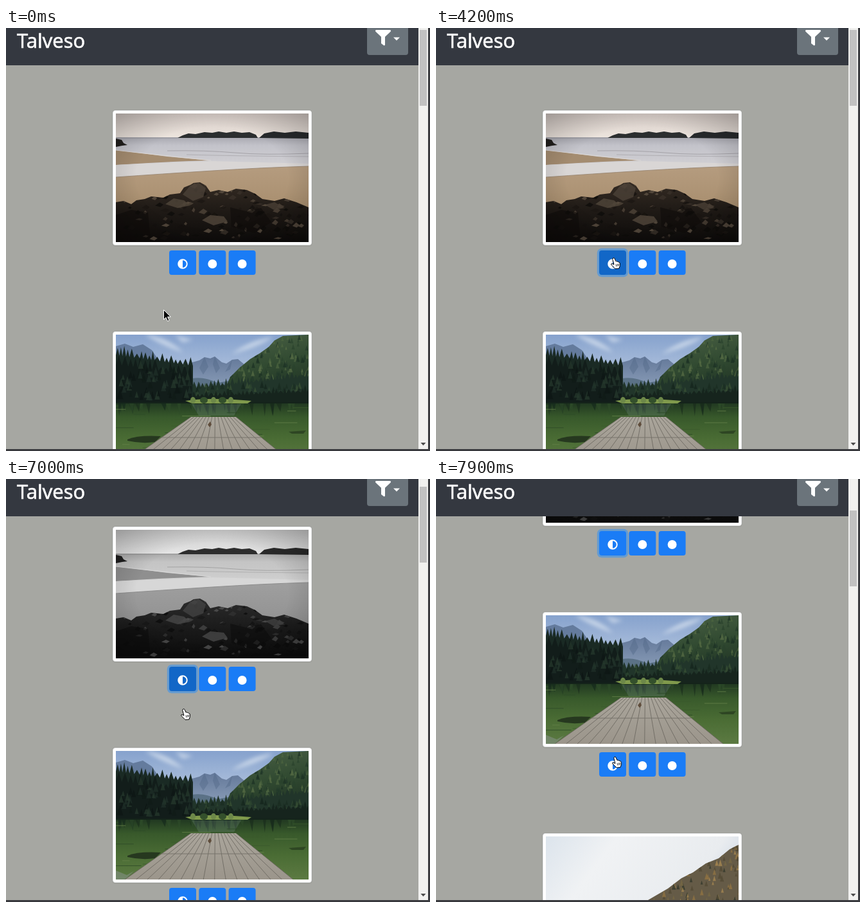
An HTML page for the animation above (8000 ms loop, 660 px wide and 658 px high).

```html
<!DOCTYPE html>
<html lang="en">
<head>
<meta charset="utf-8">
<title>Photo gallery</title>
<style>
  html, body { margin: 0; width: 100%; height: 100%; overflow: hidden; background: #a6a7a2; }
  svg { display: block; width: 660px; height: 658px; }
</style>
</head>
<body>
<svg id="stage" viewBox="0 0 660 658">
  <defs>
    <clipPath id="frame"><rect width="300" height="200"/></clipPath>
    <clipPath id="rockClip"><path id="rockShape" d="M0 138L12 136 24 141 32 135 45 133 55 129 74 131 84 126 100 124 106 115 116 111 121 108 131 107 140 112 147 122 160 119 174 122 187 117 204 119 217 125 228 133 247 136 262 132 281 138 300 146V200H0Z"/></clipPath>
    <clipPath id="slopeClip"><path id="slopeShape" d="M300 13L286 20 269 34 249 42 229 56 211 65 190 81 159 99 110 140 60 200H300Z"/></clipPath>
    <clipPath id="hillClip"><path id="hillShape" d="M178 66L192 52 209 38 224 29 238 19 247 9 260 2 300 0V106H160Z"/></clipPath>
    <filter id="soft"><feGaussianBlur stdDeviation="3"/></filter>
    <filter id="grain" x="0" y="0" width="1" height="1"><feGaussianBlur stdDeviation=".5"/></filter>
    <linearGradient id="sky1" x2="0" y2="1"><stop stop-color="#d3c9c4"/><stop offset="1" stop-color="#efe7e0"/></linearGradient>
    <linearGradient id="sea" x2="0" y2="1"><stop stop-color="#a9a9b1"/><stop offset=".2" stop-color="#c3c3ca"/><stop offset="1" stop-color="#d9d7d9"/></linearGradient>
    <linearGradient id="sand" x2="0" y2="1"><stop stop-color="#b59c7f"/><stop offset=".6" stop-color="#a78d6d"/><stop offset="1" stop-color="#8c7354"/></linearGradient>
    <linearGradient id="rock" x2="0" y2="1"><stop stop-color="#342b23"/><stop offset=".5" stop-color="#1e1915"/><stop offset="1" stop-color="#0d0b0a"/></linearGradient>
    <linearGradient id="sky2" x2="0" y2="1"><stop stop-color="#86a2cd"/><stop offset="1" stop-color="#c3d1e5"/></linearGradient>
    <linearGradient id="peak" x2="0" y2="1"><stop stop-color="#637899"/><stop offset="1" stop-color="#8a9db8"/></linearGradient>
    <linearGradient id="hill" x1=".2" x2=".5" y2="1"><stop stop-color="#4a6145"/><stop offset=".5" stop-color="#314a31"/><stop offset="1" stop-color="#1d2f22"/></linearGradient>
    <linearGradient id="lake" x2="0" y2="1"><stop stop-color="#1f3620"/><stop offset=".25" stop-color="#38592b"/><stop offset=".6" stop-color="#4a6c34"/><stop offset="1" stop-color="#5c7a42"/></linearGradient>
    <linearGradient id="dock" x2="0" y2="1"><stop stop-color="#aaa59b"/><stop offset="1" stop-color="#9b958b"/></linearGradient>
    <linearGradient id="fog" x2="1" y2=".5"><stop stop-color="#dce4ec"/><stop offset=".3" stop-color="#f0f2f4"/><stop offset=".75" stop-color="#e9ecef"/><stop offset="1" stop-color="#c3d0e2"/></linearGradient>
    <radialGradient id="vignette" r=".72"><stop offset=".55" stop-opacity="0"/><stop offset="1" stop-opacity=".25"/></radialGradient>
  </defs>
  <rect width="660" height="658" fill="#a6a7a2"/>
  <g id="page"></g>

  <rect width="642" height="58" fill="#343840"/>
  <text x="17" y="31" font-family="'Open Sans', 'Noto Sans', sans-serif" font-size="31" fill="#fff" stroke="#fff" stroke-width=".7">Talveso</text>
  <path d="M562 0H626V38Q626 42 622 42H566Q562 42 562 38Z" fill="#6b747b"/>
  <path d="M576 3H598Q600 4 598.700 5.400L590 13.800V26Q589.500 28 588 27L584 24V13.800L575.300 5.400Q574 4 576 3Z" fill="#fff"/>
  <path d="M603 14.500H613L608 19.500Z" fill="#fff"/>

  <rect x="642" width="15" height="655" fill="#f1f1ef"/>
  <rect id="thumb" x="644" y="3" width="11" height="118" fill="#c1c1c1"/>
  <path d="M645.500 645H653.500L649.500 649.500Z" fill="#4c4c4c"/>
  <path d="M657 0H660V658H0V655H657Z" fill="#393a3e"/>

  <path id="arrow" d="M.5 .5V15.500L4 12.200 6.500 18 9 17 6.500 11.300H11.300Z" fill="#000" stroke="#fff"/>
  <g id="hand" stroke="#000" stroke-linejoin="round">
    <path d="M3.500 1Q5 0 6 1.500L8 6Q9.500 5.300 10.300 6.500Q12 6 12.500 7.500Q14 7.300 14.300 9L14.500 12.500 13 17 7 17.500 1 11.500Q0 9.500 2 9.500L5 11 3 3.500Q2.600 2 3.500 1Z" fill="#fff"/>
    <path d="M8 10.500L9 14M10.200 10L11 13.500M12.200 9.700L12.700 13" fill="none" stroke-width=".8"/>
  </g>
</svg>
<script>
const LOOP = 8000, STEP = 100, PITCH = 344;
const BLUE = '#1a7cf6', HOVER = '#1267c7';
const $ = id => document.getElementById(id);

let seed = 7;
const rand = (a = 0, b = 1) => {
  seed = (seed * 16807) % 2147483647;
  return a + (b - a) * seed / 2147483647;
};
const pick = list => list[Math.floor(rand(0, list.length))];
const repeat = (n, fn) => Array.from({ length: n }, (_, i) => fn(i)).join('');
const path = (d, fill, extra = '') => `<path d="${d}" fill="${fill}" ${extra}/>`;
const line = (d, color, width = 1) => path(d, 'none', `stroke="${color}" stroke-width="${width}"`);
const rect = (x, y, w, h, fill) => `<rect x="${x}" y="${y}" width="${w}" height="${h}" fill="${fill}"/>`;
const oval = (x, y, rx, ry, fill) => `<ellipse cx="${x}" cy="${y}" rx="${rx}" ry="${ry}" fill="${fill}"/>`;

// Uneven pointed treetops standing on a straight base.
function trees(x0, x1, gap, top, base, jag, fill) {
  let d = `M${x0} ${base}`;
  for (let x = x0; x < x1;) {
    const w = gap * rand(.6, 1.3), y = top(x);
    d += `L${x.toFixed(1)} ${(y + jag).toFixed(1)}L${(x + w / 2).toFixed(1)} ${(y - rand(-.5, 1) * jag).toFixed(1)}`;
    x += w;
  }
  return path(`${d}L${x1} ${top(x1) + jag}V${base}Z`, fill);
}

// Small pointed tufts scattered over a box.
const tufts = (n, x0, x1, y0, y1, h, colors, opacity = .7) => repeat(n, () => {
  const x = rand(x0, x1).toFixed(1), y = rand(y0, y1).toFixed(1), k = rand(.6, 1.2) * h;
  return path(`M${x} ${y}l${k * .3} ${-k} ${k * .3} ${k}Z`, pick(colors), `opacity="${opacity}"`);
});

function beach() {
  const facets = repeat(170, () => {
    const x = rand(-5, 300), y = rand(112, 198), w = rand(4, 13), h = rand(2, 6);
    const lit = ['#4f4438', '#5e5143', '#3a3129'], dark = ['#0e0c0a', '#15120f', '#1b1613'];
    return path(`M${x} ${y}l${w * .6} ${-h} ${w * .5} ${h * .7} ${-w * .4} ${h * .8}Z`,
      pick(rand() < .42 ? lit : dark), 'opacity=".8"');
  });
  return rect(0, 0, 300, 40, 'url(#sky1)')
    + rect(0, 37, 300, 64, 'url(#sea)')
    + path('M96 38L104 34 113 31 124 32 138 29 150 30 160 28 172 30 184 28 196 30 208 29 218 33 221 38Z', '#2b2e2f')
    + path('M223 38L231 31 246 28 263 30 280 28 300 30V39Z', '#272a2c')
    + line('M0 38H96', '#8b8b90', .7)
    + path('M0 39L9 41 12 46 18 49 10 50 0 52Z', '#211f1d')
    + line('M80 58Q140 57 185 61T300 62', '#a09da3', .9)
    + line('M110 64Q180 66 300 67', '#a5a2a7', .7)
    + path('M0 57Q35 61 80 67L146 73Q70 75 0 80Z', '#a48c70')
    + line('M0 57Q50 63 148 73', '#ddd8d5', 1)
    + path('M0 80Q80 76 150 74L300 78V85L0 99Z', '#d9d6d5')
    + path('M0 99Q70 94 150 89T300 82V200H0Z', 'url(#sand)')
    + line('M0 99Q70 94 150 89T300 82', '#94816d', .8)
    + path($('rockShape').getAttribute('d'), 'url(#rock)')
    + `<g clip-path="url(#rockClip)"><g filter="url(#grain)">${facets}`
    + path('M104 126L116 112 129 108 140 116 136 130 120 136Z', '#4c4238', 'opacity=".8"')
    + path('M77 141L90 132 106 135 116 143 96 147Z', '#51463a', 'opacity=".8"')
    + path('M134 166L147 158 168 160 174 168 152 174Z', '#52473b', 'opacity=".8"')
    + path('M232 142L247 138 263 147 246 150Z', '#493f34', 'opacity=".8"')
    + path('M0 158L24 150 50 154 54 200H0Z', '#0f0d0b', 'opacity=".6"')
    + path('M178 146L202 152 226 147 242 169 216 186 180 176Z', '#0f0d0b', 'opacity=".6"')
    + '</g></g>'
    + rect(0, 0, 300, 200, 'url(#vignette)');
}

function lake() {
  const planks = repeat(16, i => {
    const u = i / 15;
    return line(`M${117 + 70 * u} 128L${14 + 262 * u} 200`, '#68645c', .8);
  });
  const ripples = repeat(34, i => {
    const x = rand(-20, 280), y = 111 + i * 2.6;
    return line(`M${x} ${y}h${rand(10, 45)}`, pick(['#66824a', '#3a5a2c', '#2c4a26']), .8);
  });
  const streaks = repeat(36, () => {
    const x = rand(0, 300);
    return path(`M${x} 107h${rand(3, 9)}l-2 ${rand(8, 20)}Z`, pick(['#172a1b', '#13261a', '#2f4d29']), 'opacity=".6"');
  });
  return rect(0, 0, 300, 90, 'url(#sky2)')
    + path('M45 0Q80 3 105 28Q72 17 45 0M92 1L120 8 104 12ZM180 30Q214 6 245 4Q225 18 180 30', '#dde6f1', 'opacity=".7" filter="url(#soft)"')
    + path('M0 18L14 14 27 19 42 15 56 24 70 45H0Z', '#647b9d')
    + path('M108 58L119 43 130 40 138 35 147 37 154 34 165 43 172 45 181 39 190 38 202 48 190 83H108Z', 'url(#peak)')
    + path('M138 35L144 50 136 62 130 52ZM154 34L162 52 156 60 151 46ZM181 39L178 54 170 58Z', '#526888', 'opacity=".45"')
    + path('M108 71Q132 62 158 75L180 71 198 83 180 98H108Z', '#526a7c', 'opacity=".8"')
    + path($('hillShape').getAttribute('d'), 'url(#hill)')
    + `<g clip-path="url(#hillClip)">${tufts(150, 175, 300, 8, 75, 9, ['#22382a', '#2a422d', '#1b2f23', '#4d6640', '#5b7047'])}</g>`
    + trees(118, 300, 6, x => 78 - (x - 118) * .1, 107, 6, '#21352a')
    + tufts(70, 120, 298, 82, 105, 10, ['#2d4630', '#1a2c21', '#3a5335', '#14231b'])
    + trees(118, 300, 7, x => 92 - (x - 118) * .04, 107, 5, '#16241d')
    + trees(0, 120, 7, x => 24 + x * .14, 107, 8, '#1a2a24')
    + trees(0, 118, 8, x => 38 + x * .14, 107, 9, '#121d1a')
    + tufts(70, 0, 112, 50, 104, 13, ['#1f3029', '#0d1614', '#263a2e', '#101b17'])
    + rect(0, 105, 300, 95, 'url(#lake)')
    + streaks
    + path('M118 108H195L184 126H129Z', '#7c928b', 'opacity=".25"')
    + ripples
    + rect(0, 105, 300, 2, '#14231a')
    + path('M108 103Q145 97 211 103L205 107H119Z', '#809a4c')
    + [120, 137, 152, 166, 179].map((x, i) => oval(x, 102, 4 + i % 2 * 2, 5, i % 2 ? '#34502c' : '#6d8849')).join('')
    + path('M18 163Q35 156 70 158L61 167Q40 170 18 165Z', '#26381f')
    + path('M269 151L296 149 292 154 274 154Z', '#2e4623')
    + path('M0 186L17 193 28 187 14 200H0Z', '#828f83', 'opacity=".6"')
    + path('M117 128H187L276 200H14Z', 'url(#dock)')
    + planks
    + line('M71 160H226', '#77736b', 1)
    + path('M143 140l4 -5 2 5 -3 4Z', '#5f4d3b');
}

function slope() {
  return rect(0, 0, 300, 200, 'url(#fog)')
    + path($('slopeShape').getAttribute('d'), '#655b47')
    + `<g clip-path="url(#slopeClip)">${tufts(170, 145, 300, 15, 115, 9, ['#8e7142', '#a08351', '#544a36', '#373a2d', '#756743'], .85)}</g>`;
}

// Button row: contrast toggle, then two plain share marks.
function buttons(top, id) {
  return [254, 300.3, 346.6].map((x, i) => {
    const own = i === 0 && id;
    const ring = own
      ? `<rect id="ring" x="250.800" y="${top - 3.2}" width="48.400" height="44.400" rx="7" fill="#268fff" opacity=".5"/>` : '';
    const box = `<rect ${own ? `id="${id}"` : ''} x="${x}" y="${top}" width="42" height="38" rx="4" fill="${BLUE}"/>`;
    const cx = x + 21, cy = top + 21;
    const icon = i
      ? `<circle cx="${cx}" cy="${cy}" r="7" fill="#fff"/>`
      : `<circle cx="${cx}" cy="${cy}" r="6.750" fill="none" stroke="#fff" stroke-width="2"/>`
        + path(`M${cx} ${cy - 7}a7 7 0 0 0 0 14Z`, '#fff');
    return ring + box + icon;
  }).join('');
}

$('page').innerHTML = [beach, lake, slope].map((draw, i) => {
  const y = 133 + i * PITCH;
  return `<rect x="165" y="${y - 6}" width="312" height="213" rx="5" fill="#000" opacity=".05"/>`
    + `<rect x="166.500" y="${y - 4.5}" width="309" height="209" rx="3.500" fill="#fff" stroke="#e3e5e6"/>`
    + `<g transform="translate(171 ${y})"><g id="photo${i}" clip-path="url(#frame)">${draw()}</g></g>`
    + buttons(y + 213, i === 0 ? 'toggle' : '');
}).join('');

const clamp = v => Math.max(0, Math.min(1, v));
const mix = (a, b, u) => a + (b - a) * clamp(u);

function scrollAt(t) {
  if (t < 7000) return 0;
  if (t < 7200) return mix(54, 139, (t - 7000) / 200);
  const u = clamp((t - 7200) / 600);
  return Math.round(mix(139, 265, 1 - (1 - u) ** 1.7));
}

function pointerAt(t) {
  if (t >= 7900) return [278, 432.5];
  if (t >= 7500) {
    const u = (t - 7500) / 300;
    return [mix(276, 268, u), mix(358, 415, u)];
  }
  const u = (t - 400) / 600;
  return t < 500 ? [245, 438] : [mix(245, 276, u), mix(438, 358, u)];
}

function render(now) {
  const t = Math.floor((now % LOOP) / STEP) * STEP;
  const y = scrollAt(t), [px, py] = pointerAt(t);
  const gray = (t >= 2300 && t < 4200) || t >= 6000;
  const hover = t >= 900 && t < 7600;
  const hand = hover || t >= 7900;

  $('page').setAttribute('transform', `translate(0 ${-y})`);
  $('thumb').setAttribute('y', Math.round(3 + y * .1735));
  $('photo0').style.filter = gray ? 'grayscale(1)' : 'none';
  $('toggle').setAttribute('fill', hover ? HOVER : BLUE);
  $('ring').setAttribute('visibility', t >= 2300 ? 'visible' : 'hidden');
  $('arrow').setAttribute('visibility', hand ? 'hidden' : 'visible');
  $('hand').setAttribute('visibility', hand ? 'visible' : 'hidden');
  $('arrow').setAttribute('transform', `translate(${px} ${py})`);
  $('hand').setAttribute('transform', `translate(${px - 4} ${py - 1})`);
}

const start = performance.now();
function tick() {
  render(performance.now() - start);
  requestAnimationFrame(tick);
}
tick();
</script>
</body>
</html>
```
